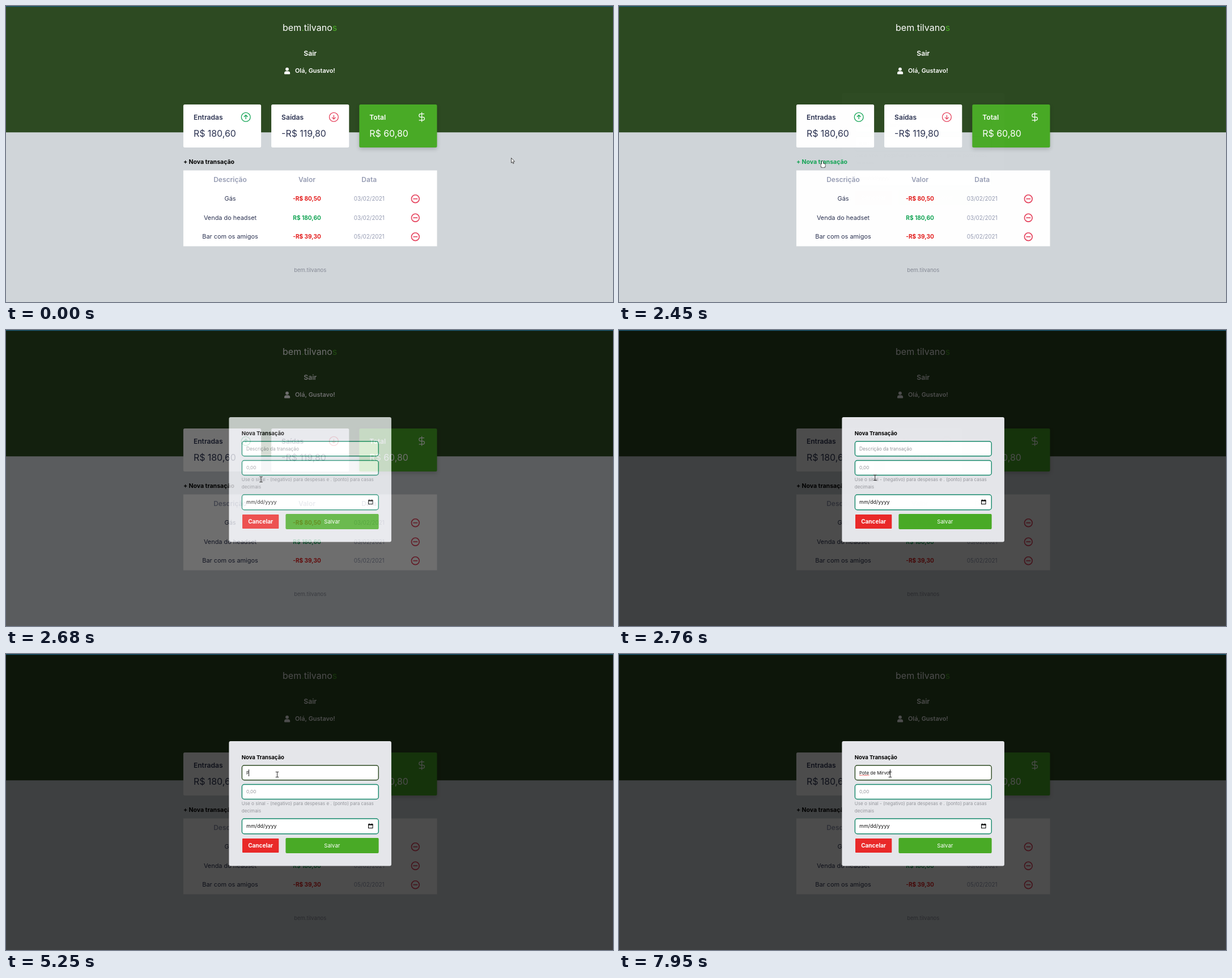
Animation, 1071 px wide and 523 px high, one loop 8000 ms. Source, as an HTML page with a canvas:

```html
<!DOCTYPE html>
<html lang="pt-BR">
<head>
<meta charset="utf-8">
<title>Controle financeiro</title>
<style>
  html, body { margin: 0; width: 100%; height: 100%; overflow: hidden; background: #d0d5d9; }
  canvas { display: block; }
</style>
</head>
<body>
<canvas id="stage" width="1071" height="523"></canvas>
<script>
const W = 1071, H = 523, LOOP = 8000, CENTER = 536.7;
const GREEN = '#49aa26', IN = '#12a454', OUT = '#e31b1b', RING = '#e5405b';
const INK = '#2c3352', MUTED = '#969cb3', FOREST = '#2d4a22', TEAL = '#15886b', HINT = '#94959b';
const FADE_START = 2440, FADE_TIME = 335, FOCUS = 3150, TYPING = 5250, BLINK = 530;

const screen = document.getElementById('stage').getContext('2d');
const layerCanvas = document.createElement('canvas');
layerCanvas.width = W;
layerCanvas.height = H;
const layer = layerCanvas.getContext('2d');
let g = screen;

const rows = [
  ['Gás', '-R$ 80,50', '03/02/2021'],
  ['Venda do headset', 'R$ 180,60', '03/02/2021'],
  ['Bar com os amigos', '-R$ 39,30', '05/02/2021']
];
const suggestions = ['dsad', 'lala', 'Luz', 'Gás', 'Cerveja', 'Venda do Quelvo'];

// Text typed in bursts, one character per KEY_STEP.
const KEY_STEP = 159;
const bursts = [[TYPING, 'P'], [5650, 'ote de '], [7150, 'Mirvol']];

// Pointer moves: start, end, target x and y, height of the arc.
const START = { x: 891, y: 268 };
const moves = [
  [70, 800, 380, 218, -140],
  [880, 1030, 365, 281, 0],
  [1190, 1350, 359, 284, 0],
  [1500, 1900, 561, 355, 0],
  [1900, 2290, 358, 274, 0],
  [2665, 2680, 450, 264, 0],
  [2680, 3220, 478.5, 213, 0]
];

function ease(start, end, t) {
  const k = Math.min(1, Math.max(0, (t - start) / (end - start)));
  return k * k * (3 - 2 * k);
}

function pointerAt(t) {
  let { x, y } = START;
  for (const [start, end, toX, toY, arc] of moves) {
    const k = ease(start, end, t);
    x += (toX - x) * k;
    y += (toY - y) * k + arc * 4 * k * (1 - k);
  }
  return { x, y };
}

function typedAt(t) {
  return bursts.map(([start, str]) =>
    t < start ? '' : str.slice(0, 1 + Math.floor((t - start) / KEY_STEP))).join('');
}

function text(str, x, y, size, weight, color, align = 'left', family = 'Inter') {
  g.font = `${weight} ${size}px ${family}, sans-serif`;
  g.textAlign = align;
  g.fillStyle = color;
  g.fillText(str, x, y);
  return g.measureText(str).width;
}

function box(x, y, w, h, color, r = 0) {
  g.fillStyle = color;
  g.beginPath();
  g.roundRect(x, y, w, h, r);
  g.fill();
}

function shadowed(blur, offset, alpha, paint) {
  g.save();
  g.shadowColor = `rgba(0,0,0,${alpha})`;
  g.shadowBlur = blur;
  g.shadowOffsetY = offset;
  paint();
  g.restore();
}

function line(color, width, ...points) {
  g.strokeStyle = color;
  g.lineWidth = width;
  g.beginPath();
  points.forEach(([x, y]) => g.lineTo(x, y));
  g.stroke();
}

function circle(x, y, r, color, width) {
  g.beginPath();
  g.arc(x, y, r, 0, Math.PI * 2);
  g.strokeStyle = g.fillStyle = color;
  g.lineWidth = width;
  width ? g.stroke() : g.fill();
}

function arrowIcon(x, y, dir, color) {
  circle(x, y, 7.9, color, 1.3);
  line(color, 1.3, [x, y - 3.6], [x, y + 3.6]);
  line(color, 1.3, [x - 3.3, y + dir * .3], [x, y + dir * 3.6], [x + 3.3, y + dir * .3]);
}

function dollarIcon(x, y) {
  const r = 2.8;
  line('#fff', 1.2, [x, y - 8.5], [x, y + 8.5]);
  g.beginPath();
  g.moveTo(x + 4.4, y - 2 * r);
  g.arc(x - 2, y - r, r, -Math.PI / 2, Math.PI / 2, true);
  g.arc(x + 2, y + r, r, -Math.PI / 2, Math.PI / 2);
  g.lineTo(x - 5, y + 2 * r);
  g.stroke();
}

function card(column, title, amount, bg, titleColor, amountColor) {
  const x = 312.9 + column * 155.2;
  const panel = () => box(x, 174, 137.2, 76, bg, 2.5);
  bg === GREEN ? shadowed(7, 3, .18, panel) : panel();
  text(title, x + 18, 200.5, 12.1, 600, titleColor);
  text(amount, x + 18, 231, 15.9, 400, amountColor);
  return x + 110.3;
}

function drawHeader() {
  box(0, 0, W, 223.3, FOREST);
  let x = 488;
  for (const [part, color] of [['bem', '#fff'], ['.', GREEN], ['tilvano', '#fff'], ['s', GREEN]])
    x += text(part, x, 44, 16, 400, color);
  text('Sair', CENTER, 87.5, 12.2, 600, '#fff', 'center');
  circle(496, 111.6, 2.9, '#fff');
  box(491, 115.2, 10.2, 5.3, '#fff', [3.5, 3.5, 1, 1]);
  text('Olá, Gustavo!', 510, 118.3, 10.9, 600, '#fff');
}

function drawTable() {
  const columns = [['Descrição', 395.5], ['Valor', 531], ['Data', 640.7]];
  box(312.9, 290.5, 447.6, 134, '#fff');
  columns.forEach(([title, x]) => text(title, x, 311.3, 12, 600, MUTED, 'center'));
  rows.forEach(([label, value, date], i) => {
    const y = 340.7 + i * 33.5;
    text(label, columns[0][1], y + 3.7, 10.9, 400, INK, 'center');
    text(value, columns[1][1], y + 3.6, 10.1, 700, value[0] === '-' ? OUT : IN, 'center');
    text(date, columns[2][1], y + 3.6, 9.9, 400, MUTED, 'center');
    circle(722.3, y, 6.9, RING, 1.6);
    line(RING, 1.6, [718.4, y], [726.2, y]);
  });
}

function drawPage(hover) {
  box(0, 0, W, H, '#d0d5d9');
  drawHeader();
  arrowIcon(card(0, 'Entradas', 'R$ 180,60', '#fff', INK, INK), 196.3, -1, IN);
  arrowIcon(card(1, 'Saídas', '-R$ 119,80', '#fff', INK, INK), 196.3, 1, RING);
  dollarIcon(card(2, 'Total', 'R$ 60,80', GREEN, '#fff', '#fff'), 196.3);
  text('+ Nova transação', 312.9, 279.2, 10.5, 700, hover ? IN : '#000');
  drawTable();
  text('bem.tilvanos', CENTER, 470, 9.5, 400, '#858995', 'center');
}

function field(y, h, color) {
  box(416.4, y, 240.8, h, '#fff', 4);
  g.strokeStyle = color;
  g.lineWidth = 1.4;
  g.stroke();
}

function calendarIcon(x, y) {
  g.strokeStyle = '#000';
  g.lineWidth = 1;
  g.strokeRect(x + .5, y + 1.5, 7.5, 6.5);
  box(x, y + 1, 8.5, 2, '#000');
  box(x + 1.3, y, 1.2, 1.5, '#000');
  box(x + 6, y, 1.2, 1.5, '#000');
}

function drawDescription(t) {
  const typed = typedAt(t);
  let width = 0;
  if (typed) width = text(typed, 424, 213, 8, 400, '#111');
  else text('Descrição da transação', 424, 212.8, 8.3, 400, HINT);

  if (typed.includes(' ')) {
    const wave = Array.from({ length: 17 }, (_, i) => [424 + i * 1.1, 214.3 + (i % 2 - .5)]);
    line('#e8332c', .8, ...wave);
  }
  const blinkOn = t >= FOCUS && Math.floor((t - FOCUS) / BLINK) % 2 === 0;
  if (typed || blinkOn) box(Math.floor(423.5 + width), 204, 1, 12, '#222');
}

function drawSuggestions() {
  shadowed(2, 1, .4, () => box(415.8, 224, 241.8, 129, '#292a2d', 1));
  suggestions.forEach((s, i) =>
    text(s, 422.3, 241.3 + i * 20.1, 7.3, 400, '#e8e8ea', 'left', 'Noto Sans'));
}

function drawModal(t) {
  const left = 415.8;
  g.clearRect(0, 0, W, H);
  box(0, 0, W, H, 'rgba(0,0,0,.7)');
  box(393.4, 154, 286.5, 220.4, '#e5e6ea', 3);
  text('Nova Transação', left, 186.3, 9.5, 700, '#000');
  field(196.7, 26, t >= FOCUS ? FOREST : TEAL);
  field(230.5, 26, TEAL);
  field(291, 26.8, TEAL);
  drawDescription(t);
  text('0,00', 424, 246.4, 8.2, 400, HINT);
  text('Use o sinal - (negativo) para despesas e . (ponto) para casas', left, 266.6, 8.1, 400, HINT);
  text('decimais', left, 280, 8.1, 400, HINT);
  text('mm/dd/yyyy', 424, 307.4, 9, 400, '#111');
  calendarIcon(639, 299.6);
  box(417, 326, 64.3, 25, '#e92929', 1);
  text('Cancelar', 449.1, 341.6, 10, 700, '#fff', 'center');
  box(493.4, 325, 164.2, 27, GREEN, 2);
  text('Salvar', 575.3, 341.6, 9.5, 400, '#fff', 'center');
  if (t >= FOCUS && t < TYPING) drawSuggestions();
}

function drawBeam() {
  line('#333', 1, [0, -4.6], [0, 4.6]);
  for (const y of [-4.6, 4.6]) line('#333', 1, [-2.8, y], [2.8, y]);
}

function drawHand() {
  for (const [grow, color] of [[.6, '#222'], [0, '#fff']]) {
    box(-grow, -grow, 2 + 2 * grow, 8 + 2 * grow, color, 1);
    box(-1.6 - grow, 4.4 - grow, 7.4 + 2 * grow, 6.8 + 2 * grow, color, 2.4);
  }
}

function drawArrow() {
  g.beginPath();
  for (const [x, y] of [[.5, .5], [.5, 9.2], [2.4, 7.5], [3.7, 10.5], [5.1, 9.9], [3.8, 7], [6.5, 6.8]])
    g.lineTo(x, y);
  g.closePath();
  g.fillStyle = '#fff';
  g.fill();
  g.strokeStyle = '#222';
  g.lineWidth = .8;
  g.stroke();
}

function drawPointer({ x, y }, paint) {
  g.save();
  g.translate(x, y);
  paint();
  g.restore();
}

function draw(t) {
  const pointer = pointerAt(t);
  const opacity = ease(FADE_START, FADE_START + FADE_TIME, t);
  const overForm = t >= 2680;
  const hover = !overForm && pointer.x > 313 && pointer.x < 404 && pointer.y > 269 && pointer.y < 282;
  g = screen;
  drawPage(hover);
  if (opacity > 0) {
    g = layer;
    drawModal(t);
    g = screen;
    g.globalAlpha = opacity;
    g.drawImage(layerCanvas, 0, 0);
    g.globalAlpha = 1;
  }
  box(0, 0, W, 1.3, '#1b5c7c');
  drawPointer(pointer, overForm ? drawBeam : hover ? drawHand : drawArrow);
}

function tick() {
  draw(performance.now() % LOOP);
  requestAnimationFrame(tick);
}
tick();
</script>
</body>
</html>
```
